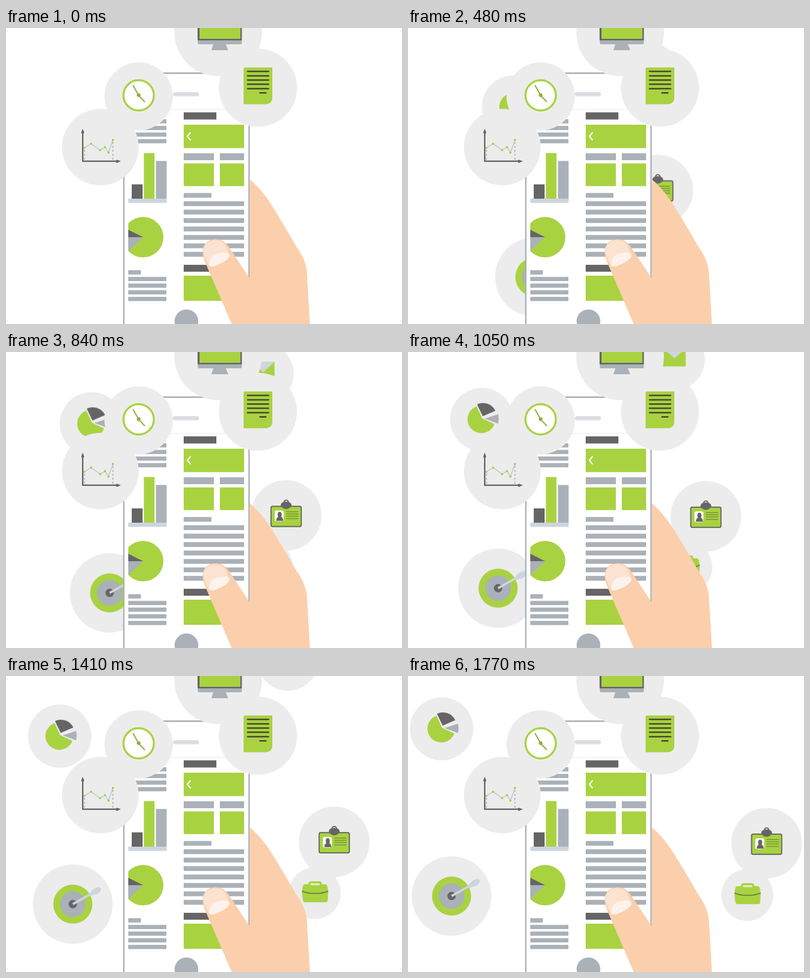
An HTML page for the animation above (1800 ms loop, 800 px wide and 600 px high).

```html
<!DOCTYPE html>
<html lang="en">
<head>
<meta charset="utf-8">
<title>Phone with floating icons</title>
<style>
  html, body { margin: 0; width: 100%; height: 100%; overflow: hidden; background: #fff; }
  svg { display: block; width: 100vw; height: 100vh; }
  .green { fill: #a9d241; }
  .gray { fill: #aab1b8; }
  .dark { fill: #656565; }
  .pale { fill: #cdd5df; }
  .white { fill: #fff; }
  .bubble { fill: #ececec; }
  .line { fill: none; stroke: #555; }

  /* each bubble drifts out from behind the phone in 30 ms steps */
  .drift { animation: drift 1.8s steps(60) infinite; }
  @keyframes drift {
    from { transform: translate(var(--x0), var(--y0)); }
    to { transform: translate(var(--x1), var(--y1)); }
  }
  #pie { --x0: 267.1px; --y0: 179.9px; --x1: 64.6px; --y1: 105.8px; }
  #target { --x0: 319px; --y0: 526.5px; --x1: 84.1px; --y1: 444.6px; }
  #card { --x0: 422.7px; --y0: 324.3px; --x1: 729.6px; --y1: 339.2px; }
  #bag { --x0: 382.8px; --y0: 424.9px; --x1: 690.6px; --y1: 444.3px; }
  #mail { --x0: 444.6px; --y0: 155.3px; --x1: 603.9px; --y1: -84.1px; }
</style>
</head>
<body>
<svg viewBox="0 0 800 600" preserveAspectRatio="none">
  <g id="mail" class="drift">
    <circle class="bubble" r="62"/>
    <rect class="green" x="-22" y="-23.5" width="45.5" height="37"/>
    <path class="pale" d="M-22-23.5H23.5L.7-2.5z"/>
  </g>

  <g id="pie" class="drift">
    <circle class="bubble" r="64"/>
    <path class="green" d="M1-2L-10.5-26.5A28 28 0 1 0 25.5 9.5z"/>
    <path class="dark" d="M2-6.5L-9.5-30.5A27.5 27.5 0 0 1 27.5-17.5z"/>
    <path class="gray" d="M6-1.5L33-10.5Q35.500-1 33 8.500z"/>
  </g>

  <g id="target" class="drift">
    <circle class="bubble" r="80.5"/>
    <circle class="green" r="39.5"/>
    <circle class="gray" r="26"/>
    <circle class="dark" r="8.5"/>
    <path d="M0 0L38-21.500" stroke="#cdd5df" stroke-width="4.500"/>
    <path class="pale" d="M33-20Q40-31 46-33Q55-37 57-31Q56-23 48-20Q41-19 35-16z"/>
  </g>

  <g id="bag" class="drift">
    <circle class="bubble" r="52.5"/>
    <path d="M-11-17V-19Q-11-22-7-22H8Q12-22 12-19V-17" fill="none" stroke="#a9d241" stroke-width="4"/>
    <path class="green" d="M-20-18H21Q25-18 26-10L27-3L26 14Q26 18.500 22 18.500H-21Q-25 18.500-25-.5V14L-26-3L-25-10Q-24-18-20-18z"/>
    <rect x="-9" y="-20" width="19" height="4" rx="2" fill="#e3eccb"/>
    <path d="M-26-4Q-14 .5-5 .5H6Q15 .5 27-4" fill="none" stroke="#667d36" stroke-width="2"/>
  </g>

  <g id="card" class="drift">
    <circle class="bubble" r="71.5"/>
    <rect class="green" x="-30.500" y="-18.500" width="61" height="41" rx="3" stroke="#555" stroke-width="2"/>
    <path class="line" d="M-5-26Q-4-31 0-31T5-26" stroke-width="2"/>
    <path class="dark" d="M-11-20Q-11-25-6-27Q0-29 6-27Q11-25 11-20Q7-13 0-13T-11-20z"/>
    <rect class="white" x="-23" y="-10" width="18" height="22" rx="4"/>
    <path class="dark" d="M-13-7.500Q-9-7-9-2Q-9 1-10 3Q-6 4-6 11H-20Q-20 4-16 3Q-18 0-17-3Q-17-7-13-7.500z"/>
    <path d="M0-7.500H25M0-3H25M0 1.500H25M0 6.500H25" stroke="#6d8738" stroke-width="1.500"/>
  </g>

  <g id="phone">
    <rect class="white" x="238" y="91.500" width="253" height="560" rx="28" stroke="#a8afba" stroke-width="2.800"/>
    <path d="M240 165H490" stroke="#eceef1" stroke-width="1.500"/>
    <rect x="337" y="130" width="53" height="8.500" rx="4.200" fill="#dadde3"/>
    <circle class="gray" cx="364.500" cy="594.500" r="24"/>

    <g id="bars" class="gray"></g>

    <rect class="dark" x="254" y="317" width="22" height="29"/>
    <rect class="green" x="278.500" y="253.500" width="21.500" height="93"/>
    <rect class="gray" x="303" y="269.500" width="21.500" height="77"/>
    <rect class="pale" x="247" y="346" width="77.500" height="8.500"/>

    <path class="green" d="M247 396A41 41 0 1 1 247 452z"/>
    <path class="dark" d="M277 424L247 409V424z"/>
    <path class="gray" d="M277 424H247V452z"/>

    <rect class="dark" x="359" y="171" width="66" height="14.500"/>
    <rect class="green" x="359" y="196" width="122" height="47.500"/>
    <path d="M373 211.500L366.500 219.500L373 227.500" fill="none" stroke="#fff" stroke-width="2.600"/>
    <rect class="green" x="359" y="274.500" width="61" height="46"/>
    <rect class="green" x="432" y="274.500" width="49" height="46"/>
    <rect class="dark" x="359" y="480" width="66" height="14"/>
    <rect class="green" x="359" y="502" width="90" height="51"/>
  </g>

  <g id="hand">
    <path fill="#fbcfab" d="M492 306Q514 325 532 352Q549 378 587 444Q606 470 608 496L614 600H456L402 474Q393 450 402 438Q410 428 424 428Q438 428 449 442L492 507z"/>
    <path fill="#fce3d1" d="M411 484L401 463Q395 447 404 438Q412 430 423 430Q436 430 444 441L451 460z"/>
    <path fill="#fdf3ec" d="M411 482Q411 464 422 459Q434 454 448 456Q453 459 451 464Q444 474 430 479Q416 486 411 482z"/>
  </g>

  <g id="monitor">
    <circle class="bubble" cx="428.500" cy="9" r="88.500"/>
    <path class="dark" d="M387-40H476.500V25H387z"/>
    <path class="green" d="M391-40H473.500V22H391z"/>
    <path class="gray" d="M387.500 25H476.500V30Q476.500 33 474 33H444L449 45H415L419 33H390Q387.500 33 387.500 30z"/>
  </g>

  <g id="note">
    <circle class="bubble" cx="509" cy="121" r="79"/>
    <path class="green" d="M483 80H538V143Q537 153 526 154.500H480V83Q480 80 483 80z"/>
    <path class="line" d="M488 88H530.500M488 97H530.500M488 105.500H530.500M488 114H530.500M488 123H530.500M513 131.500H525" stroke-width="2.800" stroke-linecap="round" style="stroke:#44492f"/>
  </g>

  <g id="clock">
    <circle class="bubble" cx="268" cy="138.500" r="69"/>
    <circle class="white" cx="268" cy="136.500" r="30.700" stroke="#a9d241" stroke-width="4"/>
    <path d="M256.500 116L268 136.500L280.500 150" fill="none" stroke="#8fae3d" stroke-width="2.500"/>
    <circle cx="268" cy="136" r="3.800" fill="#8fae3d"/>
  </g>

  <g id="graph">
    <circle class="bubble" cx="190.500" cy="241.500" r="77.500"/>
    <path class="line" d="M155 209V270H228" stroke-width="2.500"/>
    <path class="dark" d="M155 204L158 212L155 217L152 212zM232 270L224 267L220 270L224 273.500z"/>
    <path class="line" d="M158.500 247V268M216 231V268" stroke-width="1.500" stroke-dasharray="4 4" style="stroke:#9aa1aa"/>
    <g id="trend"></g>
  </g>
</svg>
<script>
  const add = (parent, tag, attrs) => {
    const el = document.createElementNS('http://www.w3.org/2000/svg', tag);
    for (const key in attrs) el.setAttribute(key, attrs[key]);
    document.getElementById(parent).append(el);
  };
  const bar = (x, y, width, height) => add('bars', 'rect', { x, y, width, height });

  for (let i = 0; i < 4; i++) {
    bar(247, 185 + i * 13.4, 77, 8.5);
    bar(247, 504.5 + i * 13.5, 77, 8.5);
  }
  for (let i = 0; i < 7; i++) bar(359, 351.2 + i * 17.1, 122, 9.8);
  bar(247, 491, 25.5, 8.8);
  bar(359, 254, 61, 14);
  bar(432, 254, 49, 14);
  bar(359, 334.5, 56, 9.5);

  const trend = [[158, 243], [172, 234.5], [190, 247.5], [200, 241.5], [207, 252.5], [216, 227]];
  add('trend', 'polyline', { points: trend.join(' '), fill: 'none', stroke: '#c3cbd5', 'stroke-width': 2 });
  for (const [cx, cy] of trend) add('trend', 'circle', { cx, cy, r: 2.3, class: 'green' });
</script>
</body>
</html>
```
